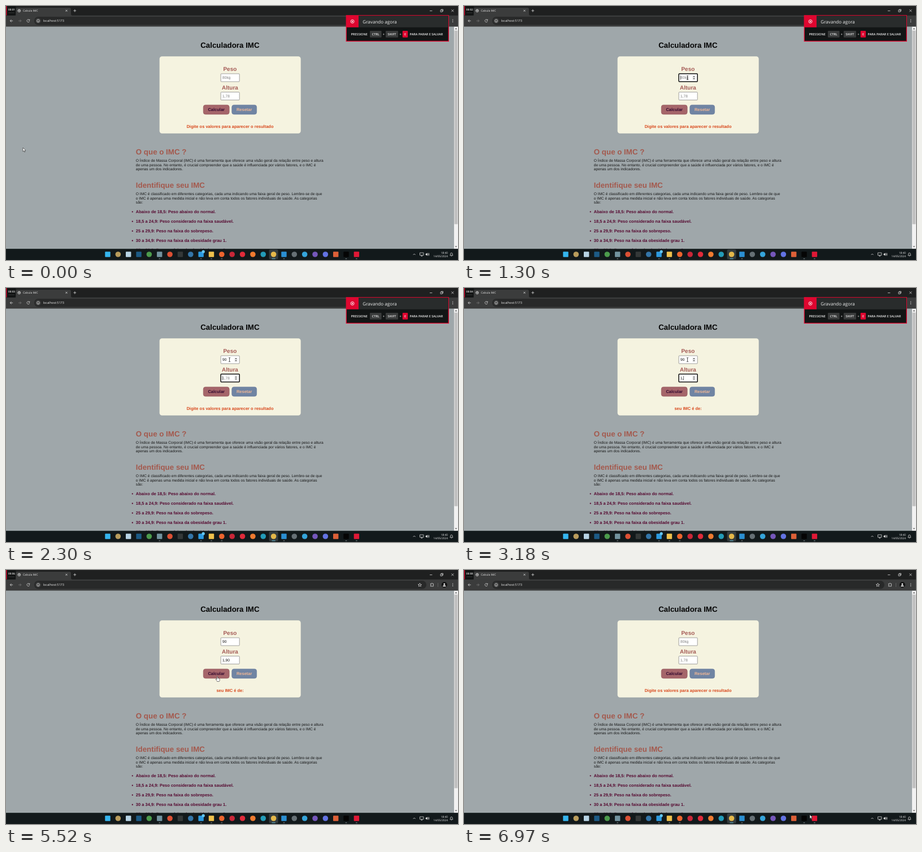
Animation of 800x450 px, one loop 7000 ms. Source, as an HTML page:

```html
<!DOCTYPE html>
<html lang="pt-BR">
<head>
<meta charset="utf-8">
<title>Calcula IMC</title>
<style>
html, body { margin: 0; width: 100%; height: 100%; overflow: hidden; background: #9fa7aa; }
svg { display: block; width: 800px; height: 450px; }
text { font: 6.667px "Liberation Sans", Arial, sans-serif; fill: #161616; text-rendering: geometricPrecision; white-space: pre; }
.h { font-weight: 700; font-size: 13.333px; fill: #a4594d; }
.label { font-weight: 700; font-size: 10px; fill: #a55b56; text-anchor: middle; }
.b { font-weight: 700; font-size: 7.5px; }
.mid { text-anchor: middle; }
.ui { font-family: "Open Sans", "Noto Sans", sans-serif; fill: #eee; }
.key { font-size: 5.5px; font-weight: 600; }
.line { fill: none; stroke: #d8d8d8; stroke-width: .8; }
</style>
</head>
<body>
<svg id="stage" viewBox="0 0 800 450" xmlns="http://www.w3.org/2000/svg"></svg>
<script>
const LOOP = 7000, BLINK = 530;

const attrs = o => Object.entries(o).map(([k, v]) => ` ${k}="${v}"`).join('');
const rect = (x, y, w, h, fill, o = {}) => `<rect x="${x}" y="${y}" width="${w}" height="${h}" fill="${fill}"${attrs(o)}/>`;
const dot = (x, y, r, fill, o = {}) => `<circle cx="${x}" cy="${y}" r="${r}" fill="${fill}"${attrs(o)}/>`;
const path = (d, o = {}) => `<path d="${d}"${attrs(o)}/>`;
const line = (d, o = {}) => path(d, { class: 'line', ...o });
const text = (x, y, s, cls = '', style = '', id = '') =>
  `<text x="${x}" y="${y}" class="${cls}" style="${style}"${id && ` id="${id}"`}>${s}</text>`;

function browser() {
  return rect(0, 0, 800, 17, '#1f2020') +
    path('M14 17Q17 17 17 14V6Q17 3 20 3H112Q115 3 115 6V14Q115 17 118 17Z', { fill: '#3b3c3c' }) +
    rect(0, 16.8, 800, 19.7, '#3b3c3c') +
    rect(50, 19, 694, 14.5, '#282929', { rx: 7.2 }) +
    dot(23.3, 8.4, 2.4, 'none', { class: 'line' }) +
    line('M21 8H23L24 10M23 6L24 8H25.5', { 'stroke-width': .5 }) +
    text(30, 10.3, 'Calcula IMC', 'ui', 'font-size:4.9px') +
    line('M105.4 6.7L108.6 9.9M108.6 6.7L105.4 9.9') +
    line('M119.4 8.3H124.2M121.8 5.9V10.7') +
    line('M750 8.6H754.4') +
    line('M769 7.2H772.2V10.4H769ZM770.3 7V6H773.5V9.2H772.3', { 'stroke-width': .7 }) +
    line('M788.4 6.3L792.4 10.3M792.4 6.3L788.4 10.3') +
    line('M12.2 26.3H7.3M9.6 24L7.3 26.3L9.6 28.6') +
    line('M22 26.3H26.9M24.6 24L26.9 26.3L24.6 28.6', { style: 'stroke:#777' }) +
    line('M41.5 25A2.4 2.4 0 1 0 41.7 27M41.8 23.6V25.4H40') +
    dot(57, 26.3, 5, '#3b3c3c') + dot(57, 26.3, 2.5, 'none', { class: 'line' }) +
    line('M57 26V27.8M57 24.8V25.3', { 'stroke-width': .7 }) +
    text(65.5, 28.3, 'localhost:5173', 'ui', 'font-size:5.55px') +
    line('M732.4 23.4L733.3 25.4L735.4 25.6L733.8 27L734.3 29.1L732.4 28L730.5 29.1L731 27L729.4 25.6L731.5 25.4Z', { 'stroke-width': .7 }) +
    line('M751.4 24.3H753A1 1 0 0 1 755 24.3H756.4V28.8H751.4V27.4A.9 .9 0 0 0 751.4 25.6Z') +
    line('M764.5 23V30', { style: 'stroke:#666' }) +
    dot(775.8, 26.3, 5, '#111') + dot(775.8, 25, 1.5, '#eee') +
    path('M773 29.2Q773 27 775.8 27T778.6 29.2Z', { fill: '#eee' }) +
    [24.2, 26.3, 28.4].map(y => dot(790.7, y, .65, '#ddd')).join('');
}

const inputs = { peso: 127, altura: 159.6 };

function field(id, y) {
  return rect(380.2, y - 7, 33, 14, '#fff', { id: id + 'Box', rx: 1 }) +
    text(383, y + 2.3, '', '', '', id + 'Text') +
    rect(383, y - 3.8, .6, 7.6, '#111', { id: id + 'Caret' }) +
    `<g id="${id}Spin">` + rect(404, y - 4, 6, 8, '#eeeeee') +
    path(`M405.4 ${y - 1}L407 ${y - 3}L408.6 ${y - 1}ZM405.4 ${y + 1}L407 ${y + 3}L408.6 ${y + 1}Z`, { fill: '#444' }) + '</g>';
}

function page() {
  const paragraph = (y, lines) => lines.map((s, i) => text(229.8, y + i * 7.6, s)).join('');
  const items = ['Abaixo de 18,5: Peso abaixo do normal.', '18,5 a 24,9: Peso considerado na faixa saudável.',
    '25 a 29,9: Peso na faixa do sobrepeso.', '30 a 34,9: Peso na faixa da obesidade grau 1.',
    '35 a 39,9: Peso na faixa da obesidade grau 2.'];
  return rect(0, 36.4, 800, 394, '#9fa7aa') +
    text(396.4, 73.6, 'Calculadora IMC', 'h mid', 'fill:#050505') +
    rect(271.7, 89.2, 250, 136.6, '#f5f3e0', { rx: 4.5 }) +
    text(396.4, 115.3, 'Peso', 'label') + field('peso', inputs.peso) +
    text(396.4, 147.8, 'Altura', 'label') + field('altura', inputs.altura) +
    rect(349.2, 175.3, 46, 16.7, '#a5656a', { rx: 4, stroke: '#8f5459', 'stroke-width': .5 }) +
    text(372.2, 186.2, 'Calcular', 'b mid', 'fill:#32092f') +
    rect(399.7, 175.3, 44, 16.7, '#7084a3', { rx: 4, stroke: '#62769a', 'stroke-width': .5 }) +
    text(421.7, 186.2, 'Resetar', 'b mid', 'fill:#efb795') +
    text(396.6, 215.6, '', 'b mid', 'fill:#d8481c', 'result') +
    text(229.8, 262.9, 'O que o IMC ?', 'h') +
    paragraph(276.2, ['O Índice de Massa Corporal (IMC) é uma ferramenta que oferece uma visão geral da relação entre peso e altura',
      'de uma pessoa. No entanto, é crucial compreender que a saúde é influenciada por vários fatores, e o IMC é',
      'apenas um dos indicadores.']) +
    text(229.8, 321.7, 'Identifique seu IMC', 'h') +
    paragraph(334.9, ['O IMC é classificado em diferentes categorias, cada uma indicando uma faixa geral de peso. Lembre-se de que',
      'o IMC é apenas uma medida inicial e não leva em conta todos os fatores individuais de saúde. As categorias',
      'são:']) +
    items.map((s, i) => dot(223.8, 364.6 + i * 17.05, 1.15, '#560930') +
      text(229.8, 366.7 + i * 17.05, s, 'b', 'fill:#560930')).join('') +
    rect(793, 36.4, 7, 394, '#f1f1f1') + rect(793.6, 43.5, 5.8, 343, '#c1c1c1') +
    path('M794.7 41.2L796.5 39L798.3 41.2ZM794.7 425.4L796.5 427.6L798.3 425.4Z', { fill: '#505050' });
}

function taskbar() {
  // Each entry: shape, colour, running mark
  const icons = ['s#35b5ee', 'c#b99c5c', 's#b8d4e5', 's#1d5b86', 'c#4c9b4c', 's#73939f-', 'c#dc5034', 's#343838',
    'c#3476a9', 's#2d9be0-', 's#f0c14c-', 'c#ec642e-', 'c#c92738', 'c#e02b3a', 'c#ef7b30', 'c#239bb8', 'c#e4b84a-',
    's#2b8fd2-', 'c#667075', 'c#35a4da', 'c#7557bb', 'c#6373e3', 's#dd6038', 's#050505-', 's#e01836-'];
  const icon = (s, i) => {
    const x = 180 + i * 18.35, fill = s.slice(1, 8);
    return (i === 16 ? rect(x - 8, 431.5, 16, 17, '#343c3e', { rx: 2 }) : '') +
      (s[0] === 'c' ? dot(x, 440, 4.8, fill) : rect(x - 4.7, 435.3, 9.4, 9.4, fill, { rx: 1 })) +
      (s.endsWith('-') ? rect(x - (i === 16 ? 3.2 : 1.4), 447.3, i === 16 ? 6.4 : 2.8, 1, i === 16 ? '#69bfd8' : '#899194', { rx: .5 }) : '');
  };
  return rect(0, 430.2, 800, 19.8, '#12191b') + icons.map(icon).join('') + dot(349.2, 435.2, 2.6, '#64c6f2') +
    line('M720.6 441L722.6 439L724.6 441') +
    line('M732.5 437.2H739V441.6H732.5ZM734.4 443.2H737.2M735.8 441.6V443') +
    path('M742.7 438.8H744L745.8 437.2V442.8L744 441.2H742.7Z', { fill: '#ddd' }) +
    line('M746.9 438.5Q748 440 746.9 441.5M748.1 437.4Q749.8 440 748.1 442.6', { 'stroke-width': .6 }) +
    text(782, 438.5, '18:40', 'ui', 'font-size:4.8px;text-anchor:end') +
    text(782, 445.3, '14/05/2024', 'ui', 'font-size:4.8px;text-anchor:end') +
    line('M785.8 441.8L786.6 440.6V439.2A1.8 1.8 0 0 1 790.2 439.2V440.6L791 441.8ZM787.6 443H789.2', { 'stroke-width': .7 });
}

function notice() {
  const key = (x, w, s, fill = '#393b3b') => rect(x, 44, w, 11.8, fill, { rx: 1 }) + text(x + w / 2, 51.9, s, 'ui key mid');
  return '<g id="notice">' + rect(602.3, 16.8, 181, 45.6, '#121515', { stroke: '#e10b32', 'stroke-width': 1.3 }) +
    rect(624, 17.4, 158.7, 20.4, '#292c2c') + rect(602.5, 17, 21.5, 20.8, '#df0630') +
    dot(613.1, 27.4, 3, 'none', { stroke: '#fff', 'stroke-width': .9 }) + dot(613.1, 27.4, 1.2, '#fff') +
    text(631.3, 30.9, 'Gravando agora', 'ui', 'font-size:8.1px') +
    text(610.4, 51.9, 'PRESSIONE', 'ui key') + key(644, 20.6, 'CTRL') + text(668.3, 51.9, '+', 'ui key mid') +
    key(672, 22, 'SHIFT') + text(698, 51.9, '+', 'ui key mid') + key(701.8, 9.4, 'E', '#df0630') +
    text(714.6, 51.9, 'PARA PARAR E SALVAR', 'ui key') + '</g>';
}

function recorder() {
  return rect(0, 0, 17.2, 16.6, '#121414') + rect(0, 0, 1.5, 16.6, '#c80c2e') +
    text(10, 7.6, '', 'ui mid', 'font-size:4.7px;font-weight:600', 'clock') + rect(4.5, 11.6, 10.5, .8, '#3b3e3e');
}

function pointer() {
  const skin = { fill: '#fff', stroke: '#111', 'stroke-width': .55, 'stroke-linejoin': 'round' };
  return '<g id="pointer">' +
    path('M0 0V6.9L1.6 5.4L2.7 7.9L3.8 7.4L2.7 5H4.9Z', { ...skin, id: 'arrow' }) +
    path('M-1.5 -3.5H-.4L0 -3.1L.4 -3.5H1.5M0 -3.1V3.1M-1.5 3.5H-.4L0 3.1L.4 3.5H1.5', { fill: 'none', stroke: '#111', 'stroke-width': .75, id: 'beam' }) +
    path('M-.8 .6Q0 -.5 .8 .6V3.2Q1.5 2.7 2 3.4Q2.8 3 3.2 3.8Q4.2 3.6 4.2 4.8V6.8Q4 8 3.4 9H-.3Q-.6 8-1.8 6.6L-2.8 5.2Q-2.5 4.1-1.5 4.8L-.8 5.5Z', { ...skin, id: 'hand' }) + '</g>';
}

const stage = document.getElementById('stage');
stage.innerHTML = page() + taskbar() + browser() + notice() + recorder() + pointer();
const el = Object.fromEntries([...stage.querySelectorAll('[id]')].map(n => [n.id, n]));

const moves = [[250, 30, 251], [1050, 395.6, 127], [4780, 395.6, 127], [5330, 374, 188.5],
  [5880, 374, 188.5], [6120, 421, 187], [6400, 421, 187], [6930, 612, 433.6]];

// Time, weight, height, focused field, result
const ASK = 'Digite os valores para aparecer o resultado', OPEN = 'seu IMC é de:';
const steps = [
  [0, '', '', '', ASK], [1150, '', '', 'peso', ASK], [1700, '9', '', 'peso', ASK], [1880, '90', '', 'peso', ASK],
  [2220, '90', '', 'altura', ASK], [2520, '90', '1', 'altura', OPEN], [2700, '90', '1,', 'altura', OPEN],
  [4480, '90', '1,9', 'altura', OPEN], [4640, '90', '1,90', 'altura', OPEN], [5480, '90', '1,90', '', OPEN],
  [5600, '90', '1,90', '', OPEN + ' 24.93'], [6280, '', '', '', ASK]];

const ease = p => p * p * (3 - 2 * p);
const show = (n, on) => n.setAttribute('visibility', on ? 'visible' : 'hidden');

function position(t) {
  const i = moves.findIndex(m => m[0] > t);
  if (i === 0) return moves[0].slice(1);
  if (i < 0) return moves.at(-1).slice(1);
  const [t0, x0, y0] = moves[i - 1], [t1, x1, y1] = moves[i];
  const p = ease((t - t0) / (t1 - t0));
  return [x0 + (x1 - x0) * p, y0 + (y1 - y0) * p];
}

function drawField(id, value, hint, focused, hover, age) {
  const box = el[id + 'Box'], label = el[id + 'Text'], caret = el[id + 'Caret'];
  box.setAttribute('stroke', focused ? '#101010' : '#7b7b7b');
  box.setAttribute('stroke-width', focused ? 1.5 : .7);
  label.textContent = value || hint;
  label.style.fill = value ? '#111' : '#7d7d7d';
  const width = [...value].reduce((w, c) => w + (c === ',' ? .278 : .556), 0) * 6.667;
  caret.setAttribute('x', 382.9 + width);
  show(caret, focused && Math.floor(age / BLINK) % 2 === 0);
  show(el[id + 'Spin'], focused || hover);
}

function draw(t) {
  const [x, y] = position(t);
  const [since, peso, altura, focus, result] = steps.findLast(s => s[0] <= t);
  const over = (x0, x1, y0, y1) => x >= x0 && x <= x1 && y >= y0 && y <= y1;
  const onField = id => over(380, 413, inputs[id] - 7, inputs[id] + 7);
  drawField('peso', peso, '80kg', focus === 'peso', onField('peso'), t - since);
  drawField('altura', altura, '1,78', focus === 'altura', onField('altura'), t - since);
  el.result.textContent = result;
  el.clock.textContent = '00:0' + Math.floor(t / 1000 + 1.031);
  el.notice.setAttribute('opacity', Math.max(0, Math.min(1, (4100 - t) / 200)));

  const hand = over(349, 395, 175, 192) || over(399.5, 444, 175, 192);
  const beam = onField('peso') || onField('altura');
  el.pointer.setAttribute('transform', `translate(${x} ${y})`);
  show(el.hand, hand);
  show(el.beam, beam);
  show(el.arrow, !hand && !beam);
}

const start = performance.now();
function tick() {
  draw((performance.now() - start) % LOOP);
  requestAnimationFrame(tick);
}
tick();
</script>
</body>
</html>
```
